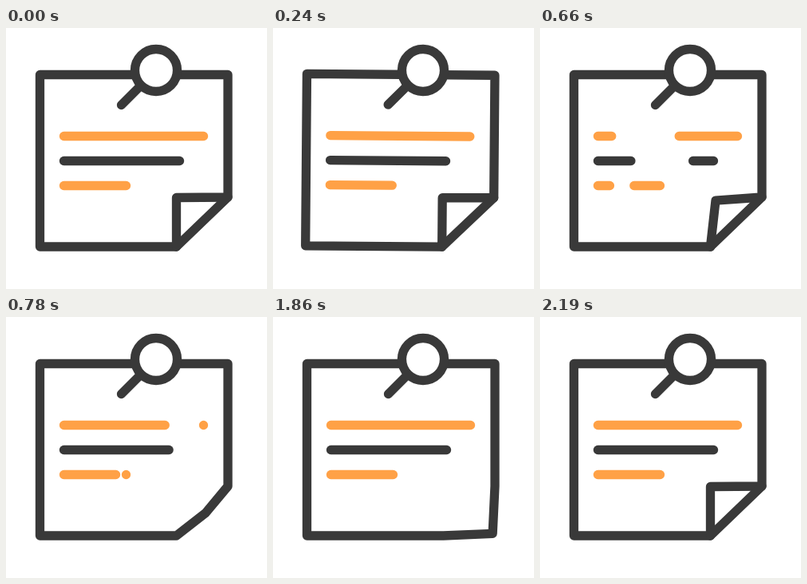
An HTML page that plays this animation: 327x327 px, repeating every 2.25 s.

```html
<!DOCTYPE html>
<html lang="en">
<head>
<meta charset="utf-8">
<title>Pinned note</title>
<style>
  html, body { margin: 0; width: 100%; height: 100%; overflow: hidden; background: #fff; }
  svg { display: block; width: 100%; height: 100%; }
  svg * { fill: none; stroke: #393939; stroke-width: 11.3; stroke-linecap: round; stroke-linejoin: round; }
  .accent { stroke: #ffa146; }
  circle { fill: #fff; }
</style>
</head>
<body>
<svg viewBox="0 0 327 327">
  <g id="note">
    <path id="sheet"/>
    <path id="crease" d="M278 212L213.5 274"/>
    <path class="accent line"/>
    <path class="line"/>
    <path class="accent line"/>
    <path d="M168 73L144.500 96.500"/>
    <circle cx="188" cy="53" r="26.5"/>
  </g>
</svg>
<script>
const LOOP = 2250;
const note = document.getElementById('note');
const sheet = document.getElementById('sheet');
const crease = document.getElementById('crease');
const linePaths = document.querySelectorAll('.line');

// Each text line is wiped from the left, then written again.
const lines = [
  { y: 135.5, length: 175, wipe: 512, write: 606 },
  { y: 166.5, length: 145, wipe: 466, write: 564 },
  { y: 197.5, length: 78, wipe: 512, write: 583 }
];
const LINE_LEFT = 72.5, LINE_TIME = 270;

// Half swings around the pin: start, end, peak angle in degrees.
const swings = [[45, 250, 3.4], [250, 450, -2.1], [450, 585, 0.8]];

// Folded corner: time, x, y.
const cornerKeys = [
  [0, 213.5, 212.5], [300, 213.5, 212.5], [555, 209, 205],
  [960, 278, 274], [1810, 278, 274], [2190, 213.5, 212.5], [LOOP, 213.5, 212.5]
];

function ease(t, start, end) {
  const p = Math.min(1, Math.max(0, (t - start) / (end - start)));
  return (1 - Math.cos(Math.PI * p)) / 2;
}

function swingAngle(t) {
  const swing = swings.find(([start, end]) => t >= start && t < end);
  if (!swing) return 0;
  const [start, end, peak] = swing;
  return peak * Math.sin(Math.PI * (t - start) / (end - start));
}

function cornerAt(t) {
  const next = cornerKeys.findIndex(key => key[0] > t);
  const [start, x0, y0] = cornerKeys[next - 1];
  const [end, x1, y1] = cornerKeys[next];
  const p = ease(t, start, end);
  return [x0 + (x1 - x0) * p, y0 + (y1 - y0) * p];
}

function linePath({ y, length, wipe, write }, t) {
  const span = (from, to) => `M${LINE_LEFT + from * length} ${y}H${LINE_LEFT + to * length}`;
  const gapEnd = ease(t, wipe, wipe + LINE_TIME);
  const gapStart = ease(t, write, write + LINE_TIME);
  return (gapStart > 0 ? span(0, gapStart) : '') + (gapEnd < 1 ? span(gapEnd, 1) : '');
}

function draw(t) {
  const [x, y] = cornerAt(t);
  note.setAttribute('transform', `rotate(${swingAngle(t)} 188 53)`);
  sheet.setAttribute('d', `M278 212V58.500H42.500V274H213.500L${x} ${y}Z`);
  crease.setAttribute('visibility', x + y < 488 ? 'visible' : 'hidden');
  lines.forEach((line, i) => linePaths[i].setAttribute('d', linePath(line, t)));
}

const startTime = performance.now();
function tick() {
  draw((performance.now() - startTime) % LOOP);
  requestAnimationFrame(tick);
}
tick();
</script>
</body>
</html>
```
